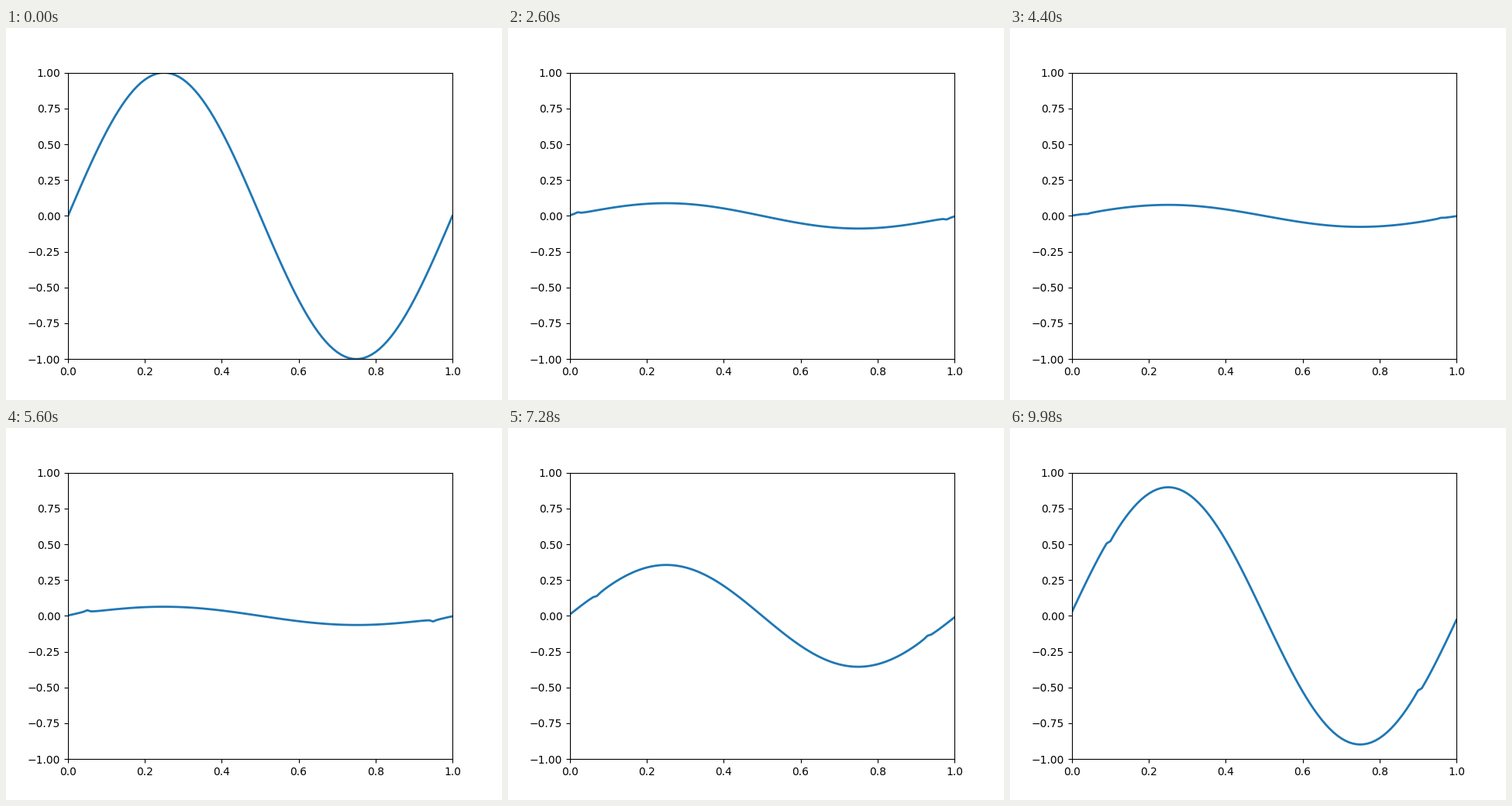
These frames come from a looping animation (640 by 480 pixels, 10 s). A matplotlib script:

```python
import numpy as np
import matplotlib.pyplot as plt
from matplotlib.animation import FuncAnimation

FRAMES = 500
INTERVAL = 20      # ms
POINTS = 101
SPEED = 0.0002     # distance travelled per frame

x = np.linspace(0, 1, POINTS)
modes = np.arange(POINTS)
spectrum = np.fft.fft(np.sin(2 * np.pi * x))


def wave(frame):
    """Let every Fourier mode oscillate at its own frequency."""
    swing = np.cos(2 * np.pi * modes * SPEED * frame)
    return np.fft.ifft(spectrum * swing).real


fig, ax = plt.subplots(figsize=(6.4, 4.8), dpi=100)
ax.set_xlim(0, 1)
ax.set_ylim(-1, 1)
line, = ax.plot(x, wave(0), lw=2, color="tab:blue")


def update(frame):
    line.set_ydata(wave(frame))
    return line,


anim = FuncAnimation(fig, update, frames=FRAMES, interval=INTERVAL,
                     blit=True, repeat=True, repeat_delay=0)
plt.show()
```
